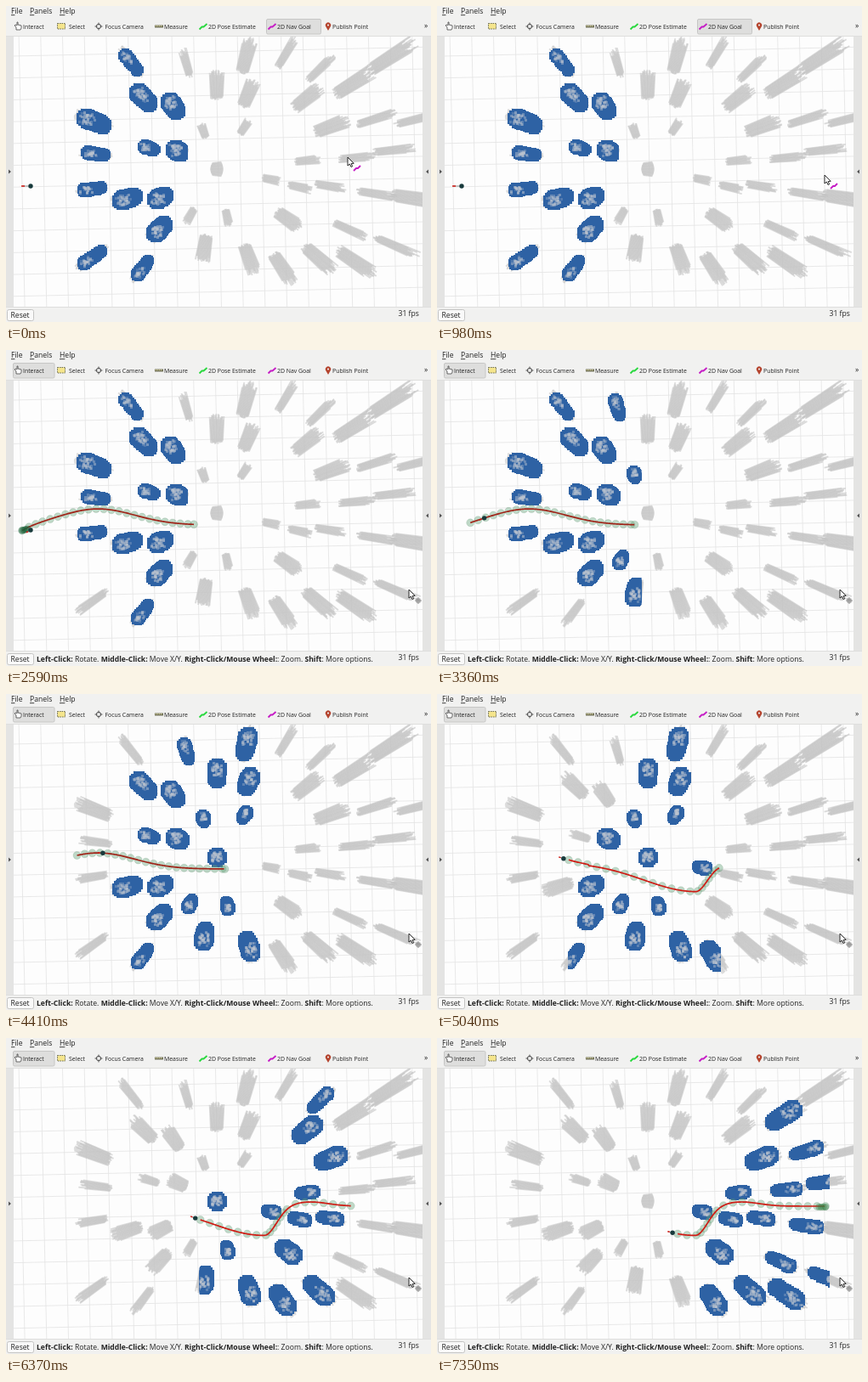
An HTML page with a canvas for the animation above (7.42 s loop, 500 by 372 pixels).

```html
<!DOCTYPE html>
<html lang="en">
<head>
<meta charset="utf-8">
<style>
html, body { margin: 0; width: 100%; height: 100%; overflow: hidden; background: #f1f1f0; }
svg, canvas { position: absolute; left: 0; top: 0; }
canvas { left: 9px; top: 36px; }
text { font: 8.6px "Open Sans", "Noto Sans", sans-serif; fill: #222; white-space: pre; }
.tools text { font-size: 6.9px; }
.u { text-decoration: underline; }
.b { font-weight: 700; }
</style>
</head>
<body>
<svg width="500" height="372" viewBox="0 0 500 372">
  <path d="M0 36h9v318h-9zM490 36h10v318h-10z" fill="#e4e4e3"/>
  <path d="M0 35.5H500M0 354.5H500" stroke="#dededd"/>
  <path d="M3 192.5l3 2.5l-3 2.5zM497 192.5l-3 2.5l3 2.5z" fill="#555"/>
  <text x="6" y="9.3"><tspan class="u">F</tspan>ile</text>
  <text x="28" y="9.3"><tspan class="u">P</tspan>anels</text>
  <text x="63" y="9.3"><tspan class="u">H</tspan>elp</text>
  <rect id="pressed" y="15.5" height="17.5" rx="1.5" fill="#dededd" stroke="#c6c6c5"/>
  <g class="tools">
    <path d="M12 28v-3l-2-2l1-1l2 1v-4h1v3l4 1v3l-1 2z" fill="#fff" stroke="#444" stroke-width=".8"/>
    <rect x="60.5" y="20.5" width="9" height="6.5" fill="#f5e58c" stroke="#6b6b50" stroke-dasharray="1.5 1"/>
    <g stroke="#555" fill="none"><circle cx="109" cy="24" r="2.7"/><path d="M104.500 24h3m3 0h3M109 19.500v3m0 3v3"/></g>
    <path d="M175 24h10" stroke="#77775c" stroke-width="3"/>
    <path d="M176 23.500h8" stroke="#e5dfa4" stroke-dasharray="1 1"/>
    <path d="M227.500 27.500l3-3h2l4-3.500" stroke="#27d83c" stroke-width="1.8" fill="none"/>
    <path d="M308.500 27.500l3-3h2l4-3.500" stroke="#c51bc5" stroke-width="1.8" fill="none"/>
    <path d="M379 29l-2.600-4.500a3.200 3.200 0 1 1 5.200 0z" fill="#b5442e"/><circle cx="379" cy="22.500" r="1.1" fill="#eee"/>
    <text x="20" y="26.5">Interact</text>
    <text x="74" y="26.5">Select</text>
    <text x="116.5" y="26.5">Focus Camera</text>
    <text x="186" y="26.5">Measure</text>
    <text x="238" y="26.5">2D Pose Estimate</text>
    <text x="319" y="26.5">2D Nav Goal</text>
    <text x="384" y="26.5">Publish Point</text>
  </g>
  <text x="492" y="26">»</text>
  <rect x="1.5" y="357.5" width="31" height="13" rx="2" fill="#f9f9f9" stroke="#c4c4c3"/>
  <text x="5.5" y="367">Reset</text>
  <text id="hint" x="36" y="367"><tspan class="b">Left-Click:</tspan> Rotate. <tspan class="b">Middle-Click:</tspan> Move X/Y. <tspan class="b">Right-Click/Mouse Wheel:</tspan>: Zoom. <tspan class="b">Shift</tspan>: More options.</text>
  <text x="461.5" y="365">31 fps</text>
</svg>
<canvas id="view" width="481" height="318"></canvas>
<script>
const LOOP = 7420, STEP = 70;
const TOOL_SWITCH = 1050, PLAN_START = 1190, DRIVE_START = 2880, REPLAN = 4870, REFINE = 5980;
const START_X = 29, SPEED = 0.0555, GOAL_X = 457;
const CAM = { x: 248, y: 192 };
const ctx = document.getElementById('view').getContext('2d');
const pressed = document.getElementById('pressed');
const hint = document.getElementById('hint');

// Layout of the pillars: centre of each foot, by thickness
const wide = [
  [248, 104], [279, 73], [281, 113], [343, 117], [391, 102], [431, 74], [368, 147], [457, 223],
  [394, 290], [355, 286], [317, 296], [323, 245], [282, 286], [235, 275], [188, 255], [154, 223],
  [189, 222], [207, 173], [119, 142], [171, 117], [202, 126], [248, 192]
];
const slim = [
  [216, 81], [277, 148], [321, 70], [357, 86], [415, 139], [460, 139], [434, 172], [394, 180],
  [343, 183], [305, 203], [335, 211], [367, 210], [415, 218], [388, 256], [436, 273], [259, 243],
  [220, 241], [170, 296], [117, 285], [117, 213], [177, 170], [121, 176], [158, 80], [234, 152]
];
const pillar = w => ([x, y]) => ({ vx: x - CAM.x, vy: y - CAM.y, w });
const pillars = [...wide.map(pillar(15)), ...slim.map(pillar(9))];

const rnd = n => { const v = Math.sin(n * 12.9898) * 43758.5453; return v - Math.floor(v); };
const clamp = v => Math.min(1, Math.max(0, v));
const mix = (a, b, f) => a + (b - a) * f;
const bell = (x, mid, width) => Math.exp(-(((x - mid) / width) ** 2));

// Two legs of the route: over a hump, then down and up between the pillars
const firstLeg = x => 206 - 19 * bell(x, 108, 62) + 9 * Math.exp((19 - x) / 18);
const secondLeg = (x, bend) => 198 + 34.5 * bell(x, 304, x < 304 ? 86 : 20) + bend * bell(x, 358, 30);
const route = (x, bend) => x < 178 ? firstLeg(x) : secondLeg(x, bend);

function robotAt(t) {
  const x = START_X + SPEED * Math.max(0, t - DRIVE_START);
  const slope = (route(x + 1, 0) - route(x, 0)) * 1.25;
  return {
    x,
    y: mix(212, route(x, 0), clamp((x - START_X) / 15)),
    heading: Math.atan(slope) * clamp((t - PLAN_START) / 450)
  };
}

function line(color, width, ...pts) {
  ctx.strokeStyle = color;
  ctx.lineWidth = width;
  ctx.beginPath();
  pts.forEach(p => ctx.lineTo(...p));
  ctx.stroke();
}

function disc(x, y, r, color) {
  ctx.fillStyle = color;
  ctx.beginPath();
  ctx.arc(x, y, r, 0, 7);
  ctx.fill();
}

function box(x, y, halfW, halfH) {
  ctx.fillRect(Math.round(x - halfW), Math.round(y - halfH), Math.round(halfW * 2), Math.round(halfH * 2));
}

function drawGrid() {
  ctx.save();
  ctx.translate(19, 213);
  ctx.rotate(-0.022);
  for (let i = -8; i < 22; i++) {
    const d = i * 25.7;
    line('#e4e4e4', 0.8, [d, -250], [d, 250]);
    line('#e4e4e4', 0.8, [-60, d], [520, d]);
  }
  ctx.restore();
}

// A tall pillar seen from above leans away from the camera
function drawStreak({ vx, vy, w }, seed) {
  const len = Math.hypot(vx, vy), a = len ? Math.atan2(vy, vx) : 0;
  ctx.save();
  ctx.translate(CAM.x, CAM.y);
  ctx.rotate(a);
  const count = Math.round(w * 1.3);
  for (let i = 0; i <= count; i++) {
    const side = i / count - 0.5, k = seed * 50 + i, round = side * side * w * 0.6;
    const near = len - w / 2 + round + rnd(k) * len * 0.04;
    const far = len * 1.25 + w / 2 - round - rnd(k + 0.5) * len * 0.08;
    line('rgba(196,196,196,.6)', 1.8, [near, side * (w - 1)], [far, side * (w - 1) * 1.2]);
  }
  ctx.restore();
}

function drawBlock({ vx, vy, w }, seed) {
  ctx.fillStyle = '#2e62a4';
  for (let i = 0; i <= 8; i++) {
    const s = mix(1.04, 1.19, i / 8), half = w / 2 + 3 + i / 8;
    const x = CAM.x + vx * s, y = CAM.y + vy * s;
    box(x, y, half, half * 0.55);
    box(x, y, half * 0.8, half * 0.8);
    box(x, y, half * 0.55, half);
  }
  for (let j = 0; j < w * 3; j++) {
    const k = seed * 90 + j, s = mix(1.13, 1.21, rnd(k + 0.7));
    ctx.fillStyle = `rgba(190,197,207,${mix(0.2, 0.55, rnd(k + 0.3))})`;
    box(CAM.x + vx * s + (rnd(k) - 0.5) * w * 0.8, CAM.y + vy * s + (rnd(k + 0.5) - 0.5) * w * 0.8, 1.5, 1.5);
  }
}

// Only pillars in front of the robot and in range are marked
function isSeen({ vx, vy }, robot) {
  const dx = CAM.x + vx * 1.1 - robot.x, dy = CAM.y + vy * 1.1 - robot.y;
  const angle = (Math.atan2(dy, dx) - robot.heading) * 180 / Math.PI;
  return dx < 178.5 && Math.hypot(dx, dy) < 215 && Math.abs(angle) < 66;
}

function pose(x, y) {
  disc(x, y, 4.5, 'rgba(105,165,125,.42)');
  ctx.strokeStyle = 'rgba(80,135,100,.3)';
  ctx.lineWidth = 0.6;
  ctx.stroke();
}

function cluster(x, y, dx, dy, color) {
  for (let i = 0; i < 4; i++) disc(x + i * dx, y + i * dy, 4, color);
}

function drawPlan(t, robot) {
  const first = t < REPLAN, done = robot.x - START_X;
  const height = first ? firstLeg : x => route(x, t < REFINE ? 4 : -5);
  const from = first ? 19 + done * 0.76 : robot.x + 6;
  const to = first ? 221 + done * 0.43 : Math.min(GOAL_X, robot.x + 183);
  const pts = [];
  let travelled = Infinity;
  for (let x = from; x <= to; x++) {
    const y = height(x), steep = Math.abs(height(x + 1) - y);
    const gap = first ? 8.5 : mix(11, 5.5, clamp(steep * 2 - 0.7));
    if (travelled >= gap) { pose(x, y); travelled = 0; }
    travelled += Math.hypot(1, steep);
    pts.push([x, y]);
  }
  pose(to, height(to));
  line(first ? '#a02318' : '#d01b14', 1.7, ...pts);
  if (!done) cluster(19, 212.5, 2, -0.6, 'rgba(25,95,55,.5)');
  if (to === GOAL_X) cluster(to, 199, -2.5, 0, 'rgba(50,125,65,.4)');
}

function drawRobot({ x, y, heading }, t) {
  const tail = t < PLAN_START ? 10 : 5;
  const back = d => [x - Math.cos(heading) * d, y - Math.sin(heading) * d];
  line('#777', 0.8, [x, y], back(tail));
  line('#d01b14', 1.5, back(tail + 1), back(tail * 0.7));
  disc(x, y, 2.7, '#183a3c');
}

function drawCursor(t) {
  const right = clamp(t / 600), down = clamp((t - 1100) / 1130) ** 2;
  ctx.save();
  ctx.translate(402 + 54 * right + 18 * down, 178 + 21 * right + 83 * down);
  if (t < TOOL_SWITCH) {
    line('#c51bc5', 1.8, [7, 16], [10, 13], [12, 13], [15, 10]);
  } else {
    line('#777', 0.8, [7, 13], [15, 13]);
    line('#777', 0.8, [11, 9], [11, 17]);
    ctx.strokeRect(9, 11, 4, 4);
  }
  const arrow = new Path2D('M0 0V10L2.400 8L4 11.500L5.600 10.800L4.200 7.500L7.200 7.300Z');
  ctx.fillStyle = '#fff';
  ctx.fill(arrow);
  ctx.strokeStyle = '#111';
  ctx.lineWidth = 0.9;
  ctx.stroke(arrow);
  ctx.restore();
}

function draw(t) {
  const goalTool = t < TOOL_SWITCH, robot = robotAt(t);
  pressed.setAttribute('x', goalTool ? 306.5 : 8.5);
  pressed.setAttribute('width', goalTool ? 64 : 48.5);
  hint.style.display = goalTool ? 'none' : '';

  ctx.setTransform(1, 0, 0, 1, -9, -36);
  ctx.fillStyle = '#fdfdfd';
  ctx.fillRect(9, 36, 481, 318);
  drawGrid();
  pillars.forEach(drawStreak);

  ctx.save();
  ctx.beginPath();
  ctx.rect(robot.x + 5, 36, 180, 318);
  ctx.clip();
  pillars.forEach((p, i) => { if (isSeen(p, robot)) drawBlock(p, i); });
  ctx.restore();

  if (t >= PLAN_START) drawPlan(t, robot);
  drawRobot(robot, t);
  drawCursor(t);
}

const begin = performance.now();
function tick() {
  const t = (performance.now() - begin) % LOOP;
  draw(Math.floor(t / STEP) * STEP);
  requestAnimationFrame(tick);
}
tick();
</script>
</body>
</html>
```
